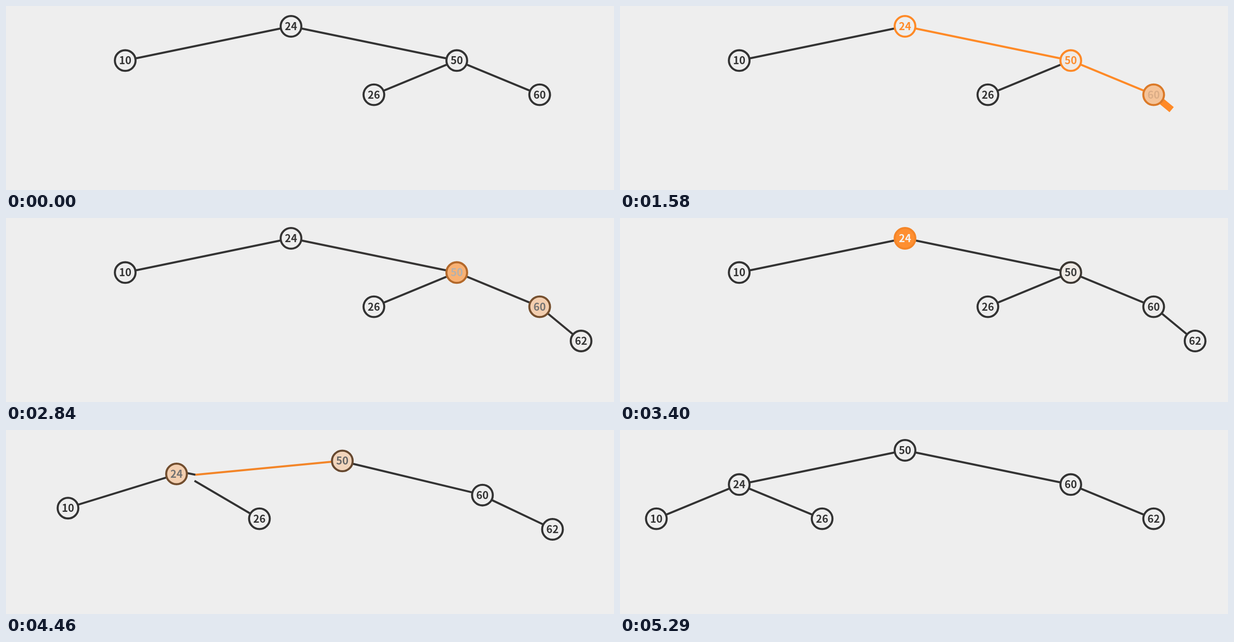
Animation, 1280 px wide and 389 px high, one loop 6.42 s. Source, as an HTML page with a canvas:

```html
<!DOCTYPE html>
<html lang="en">
<head>
<meta charset="utf-8">
<title>Balanced tree insertion</title>
<style>
html, body { margin: 0; width: 100%; height: 100%; overflow: hidden; background: #eee; }
canvas { display: block; }
</style>
</head>
<body>
<canvas id="stage" width="1280" height="389"></canvas>
<script>
const ctx = document.getElementById('stage').getContext('2d');
const LOOP = 6420, END = 5290;
const BG = [238, 238, 238], DARK = [51, 51, 51], ORANGE = [255, 138, 39], WHITE = [255, 255, 255];
const FONT = '"Noto Sans CJK JP", "Noto Sans CJK SC", "Noto Sans CJK", "Noto Sans", sans-serif';
const KEYS = [10, 24, 26, 50, 60, 62];
const ROWS = [43, 115.3, 187.6, 260];

// Column offset from the centre and tree level for each key
const place = spots => Object.fromEntries(
  spots.map(([key, dx, row]) => [key, [600 + dx, ROWS[row]]]));
const BEFORE = place([[24, 0, 0], [10, -349, 1], [50, 349, 1], [26, 174.5, 2], [60, 523.5, 2], [62, 610.7, 3]]);
const AFTER = place([[50, 0, 0], [24, -349, 1], [60, 349, 1], [10, -523.5, 2], [26, -174.5, 2], [62, 523.5, 2]]);

const cubic = t => t < 0.5 ? 4 * t ** 3 : 1 - 4 * (1 - t) ** 3;
const glide = t => t ** 1.39;

// Each step interrupts the one before it.
// hl: filled nodes, on: outlined nodes, lit: orange edges, grow: edge being traced
const steps = [
  { at: 75, dur: 330, hl: [24] },
  { at: 280, dur: 330, on: [24], grow: 50 },
  { at: 480, dur: 440, on: [24], hl: [50], lit: [50] },
  { at: 767, on: [24, 50], lit: [50], grow: 60 },
  { at: 1059, on: [24, 50], hl: [60], lit: [50, 60] },
  { at: 1350, on: [24, 50, 60], lit: [50, 60], grow: 62 },
  { at: 1613, on: [24, 50, 60], hl: [62], lit: [50, 60, 62], born: true },
  { at: 1935, born: true },
  { at: 2252, hl: [60], born: true },
  { at: 2570, hl: [50], born: true },
  { at: 2900, hl: [24], born: true },
  { at: 3280, hl: [24], born: true },
  { at: 3664, hl: [24, 50], lit: [24], born: true, linked: true },
  { at: 3985, dur: 607, ease: glide, lit: [24], born: true, linked: true, pos: AFTER },
  { at: 4502, dur: 826, born: true, linked: true, pos: AFTER }
];

function rim(pos, from, to) {
  const [x, y] = pos[from], dx = pos[to][0] - x, dy = pos[to][1] - y;
  const k = 23 / Math.hypot(dx, dy);
  return [x + dx * k, y + dy * k];
}

function edgeEnds(pos, linked) {
  const join = (a, b) => [...rim(pos, a, b), ...rim(pos, b, a)];
  const point = (a, b) => [...rim(pos, a, b), ...rim(pos, a, b)];
  return {
    10: join(24, 10),
    26: join(linked ? 24 : 50, 26),
    60: join(50, 60),
    62: join(60, 62),
    50: linked ? point(24, 50) : join(24, 50),
    24: linked ? join(24, 50) : point(50, 24)
  };
}

function pose({ hl = [], on = [], lit = [], grow, born, linked, pos = BEFORE }) {
  const nodes = {}, edges = {}, ends = edgeEnds(pos, linked);
  for (const key of KEYS) {
    const full = hl.includes(key), ring = full || on.includes(key);
    nodes[key] = [
      ...pos[key], key === 62 && !born ? 0 : 1,
      ...(full ? ORANGE : BG),
      ...(ring ? ORANGE : DARK),
      ...(full ? WHITE : ring ? ORANGE : DARK)
    ];
    edges[key] = [...ends[key], ...(lit.includes(key) || key === grow ? ORANGE : DARK)];
  }
  return { nodes, edges };
}

const start = pose({});
for (const step of steps) {
  step.dur = step.dur || 500;
  step.ease = step.ease || cubic;
  step.goal = pose(step);
}

const mix = (a, b, p) => a.map((v, i) => v + (b[i] - v) * p);

function stateAt(t) {
  const nodes = { ...start.nodes }, edges = { ...start.edges };
  steps.forEach((step, i) => {
    if (t < step.at) return;
    const stop = i + 1 < steps.length ? steps[i + 1].at : END;
    const p = step.ease(Math.min(1, (Math.min(t, stop) - step.at) / step.dur));
    if (step.grow) edges[step.grow] = step.goal.edges[step.grow];
    for (const key of KEYS) {
      nodes[key] = mix(nodes[key], step.goal.nodes[key], p);
      edges[key] = mix(edges[key], step.goal.edges[key], p);
    }
  });
  return { nodes, edges };
}

const rgb = c => `rgb(${c.map(Math.round).join(',')})`;

function line(x1, y1, x2, y2, color, width) {
  ctx.strokeStyle = rgb(color);
  ctx.lineWidth = width;
  ctx.beginPath();
  ctx.moveTo(x1, y1);
  ctx.lineTo(x2, y2);
  ctx.stroke();
}

function drawNode(key, v) {
  const [x, y, size] = v;
  if (size < 0.02) return;
  ctx.beginPath();
  ctx.arc(x, y, 21.8 * size, 0, 2 * Math.PI);
  ctx.fillStyle = rgb(v.slice(3, 6));
  ctx.fill();
  ctx.strokeStyle = rgb(v.slice(6, 9));
  ctx.lineWidth = 4.3;
  ctx.stroke();
  ctx.fillStyle = rgb(v.slice(9, 12));
  ctx.font = `bold ${22 * size}px ${FONT}`;
  ctx.fillText(key, x, y + 8 * size);
}

function draw(t) {
  const { nodes, edges } = stateAt(t);
  ctx.fillStyle = rgb(BG);
  ctx.fillRect(0, 0, 1280, 389);
  ctx.textAlign = 'center';

  for (const key of [10, 26, 60, 62, 50, 24]) {
    const [x1, y1, x2, y2, ...color] = edges[key];
    const trace = steps.find(s => s.grow === key);
    const pending = trace && t < trace.at + trace.dur;
    if (pending && key === 62) continue;
    line(x1, y1, x2, y2, pending ? DARK : color, 4.3);
  }
  for (const { grow, at, dur } of steps) {
    if (!grow || t < at || t >= at + dur) continue;
    const [x1, y1, x2, y2] = edges[grow], p = cubic((t - at) / dur);
    line(x1, y1, x1 + (x2 - x1) * p, y1 + (y2 - y1) * p, ORANGE, 14);
  }
  for (const key of KEYS) drawNode(key, nodes[key]);
}

// The picture advances in ticks of 70 ms
function tick(t) {
  if (t >= END) return END + 100;
  const offset = t < 1500 ? 50 : 40;
  return Math.max(0, Math.floor((t - offset) / 70) * 70 + offset);
}

const origin = performance.now();
function frame() {
  draw(tick((performance.now() - origin) % LOOP));
  requestAnimationFrame(frame);
}
frame();
</script>
</body>
</html>
```
